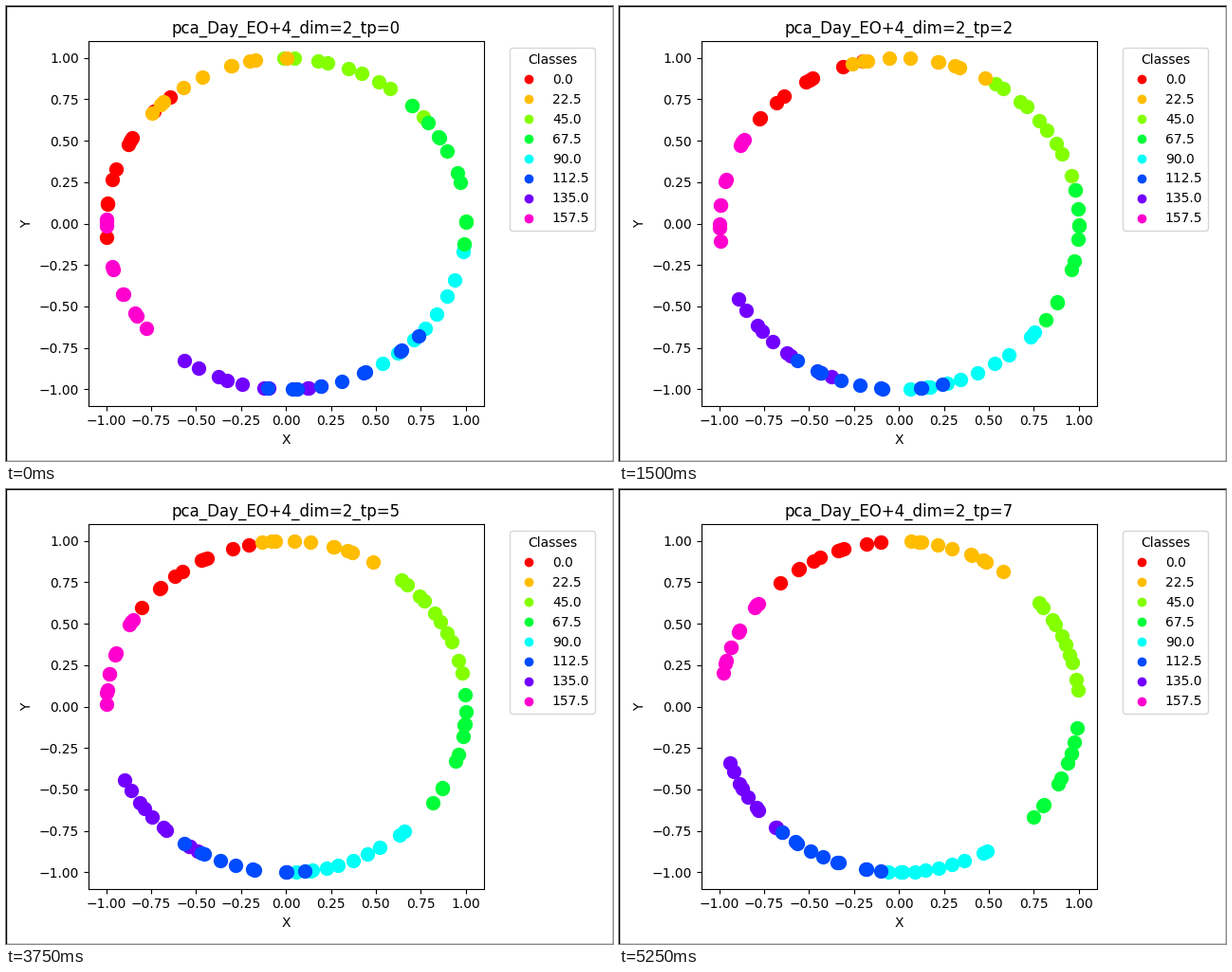
Animation, 640 px wide and 480 px high, one loop 6000 ms. Source, as a matplotlib script:

```python
import numpy as np
import matplotlib.pyplot as plt
from matplotlib.animation import FuncAnimation
from matplotlib.lines import Line2D
from matplotlib.patches import Rectangle

N_CLASSES, N_TRIALS, N_STEPS = 8, 10, 8
ORIENTATIONS = np.arange(N_CLASSES) * 22.5
COLORS = [plt.cm.hsv(v / 180) for v in ORIENTATIONS]
# Cardinal orientations lie below the oblique ones
DRAW_ORDER = [*range(0, N_CLASSES, 2), *range(1, N_CLASSES, 2)]

# Classes follow each other around the circle at twice their orientation,
# each leaning a little (degrees) from its even place.
LEAN = np.array([2, 4, 2, -1, -10, 0, 13, -2])
PLACES = 2 * ORIENTATIONS - LEAN

# Per time point: angle of the first class, then the spread shrinks steadily.
# The second time point runs the other way round.
START = [156, -5, 125, 122, 121.5, 121, 117, 112]
SPREAD = np.linspace(26, 17, N_STEPS)

rng = np.random.default_rng(4)
offsets = np.linspace(-1, 1, N_TRIALS) + rng.normal(0, 0.12,
                                                    (N_CLASSES, N_TRIALS))

fig, ax = plt.subplots(figsize=(6.4, 4.8), dpi=100)
fig.add_artist(Rectangle((0, 0), 1, 1, transform=fig.transFigure,
                         fill=False, ec="black", lw=1))
handles = [Line2D([0], [0], ls="", marker="o", ms=6, color=c, label=f"{v:.1f}")
           for v, c in zip(ORIENTATIONS, COLORS)]


def class_angles(step, k):
    turn = 1 if step == 1 else -1
    return np.radians(START[step] + turn * PLACES[k]
                      + SPREAD[step] * offsets[k])


def draw(step):
    ax.clear()
    for k in DRAW_ORDER:
        a = class_angles(step, k)
        ax.scatter(np.cos(a), np.sin(a), s=100, color=COLORS[k])
    ax.set(title=f"pca_Day_EO+4_dim=2_tp={step}", xlabel="X", ylabel="Y",
           xlim=(-1.1, 1.1), ylim=(-1.1, 1.1))
    ax.legend(handles=handles, title="Classes", loc="upper left",
              bbox_to_anchor=(1.05, 1))
    # Lay out from the default margins each time
    fig.subplots_adjust(left=0.125, right=0.9, bottom=0.11, top=0.88)
    fig.tight_layout()


anim = FuncAnimation(fig, draw, frames=N_STEPS, interval=750,
                     init_func=lambda: None, repeat=True, repeat_delay=0)
plt.show()
```
